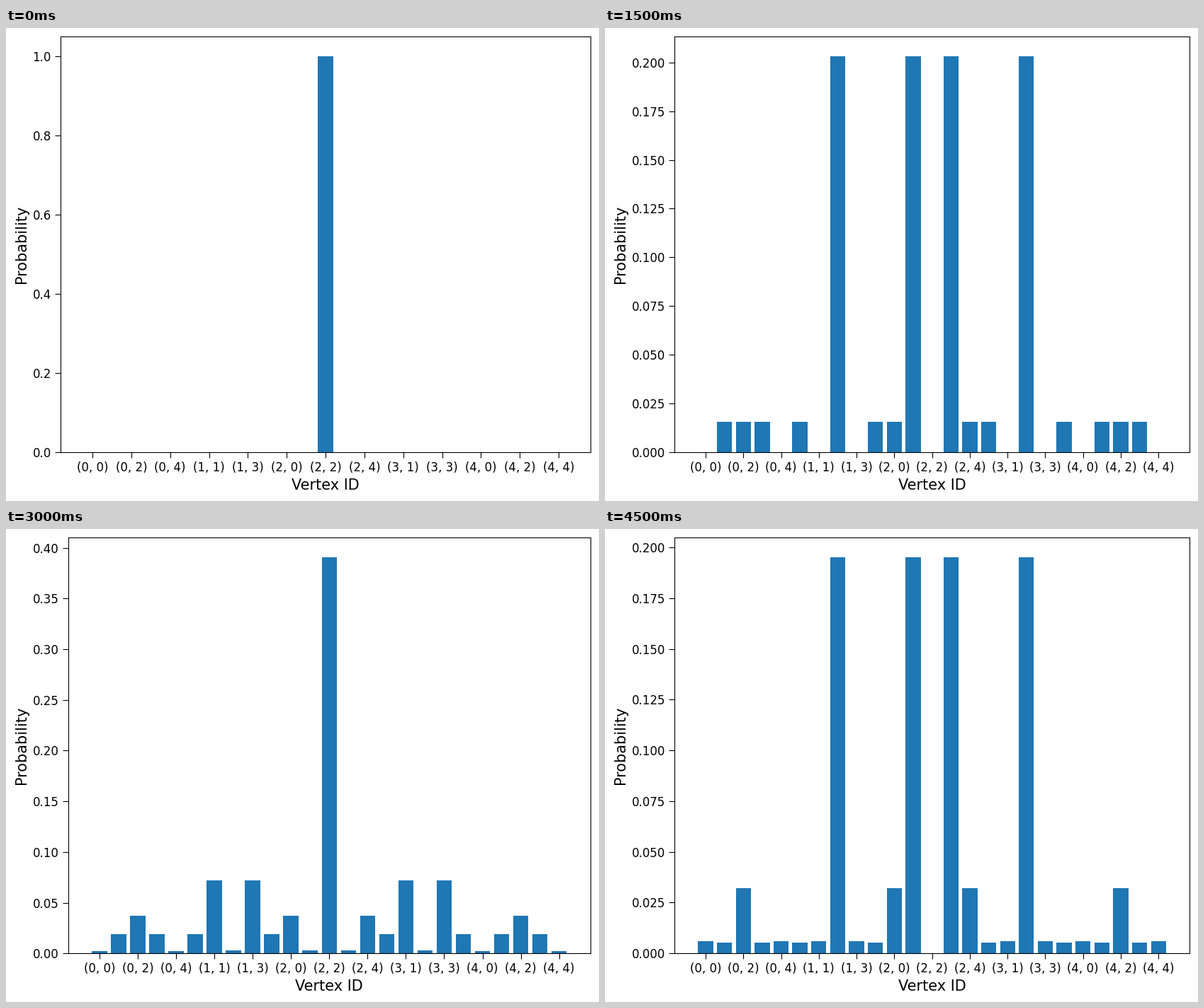
Write a matplotlib script that moves like this. It is 837x669 px and loops after 5000 ms.

```python
import matplotlib.pyplot as plt
import numpy as np
from matplotlib.animation import FuncAnimation

SIDE = 5
STEPS = 10
MOVES = ((-1, 0), (1, 0), (0, -1), (0, 1))


def walk_probabilities():
    """Grover-coin quantum walk on a torus, starting at the centre vertex."""
    coin = np.full((4, 4), 0.5) - np.eye(4)
    state = np.zeros((4, SIDE, SIDE))
    state[:, SIDE // 2, SIDE // 2] = 0.5
    history = []
    for _ in range(STEPS):
        history.append((state ** 2).sum(axis=0).ravel())
        mixed = np.tensordot(coin, state, axes=1)
        state = np.stack([np.roll(layer, move, axis=(0, 1))
                          for layer, move in zip(mixed, MOVES)])
    return history


probabilities = walk_probabilities()
vertices = np.arange(SIDE * SIDE)
ticks = vertices[::2]
tick_names = [str(divmod(int(v), SIDE)) for v in ticks]

plt.rcParams["font.family"] = "DejaVu Sans"
fig = plt.figure(figsize=(8.37001, 6.69001), dpi=100)
ax = fig.add_subplot()


def draw(step):
    fig.subplots_adjust(left=0.1, right=0.98, bottom=0.1, top=0.98)
    ax.clear()
    ax.bar(vertices, probabilities[step], color="#1f77b4")
    ax.set_xticks(ticks, tick_names)
    ax.tick_params(length=6, labelsize=12)
    ax.set_xlabel("Vertex ID", fontsize=15)
    ax.set_ylabel("Probability", fontsize=15)
    fig.tight_layout(pad=0.864)


anim = FuncAnimation(fig, draw, frames=STEPS, interval=500,
                     init_func=lambda: None, repeat=True, repeat_delay=0)
plt.show()
```
